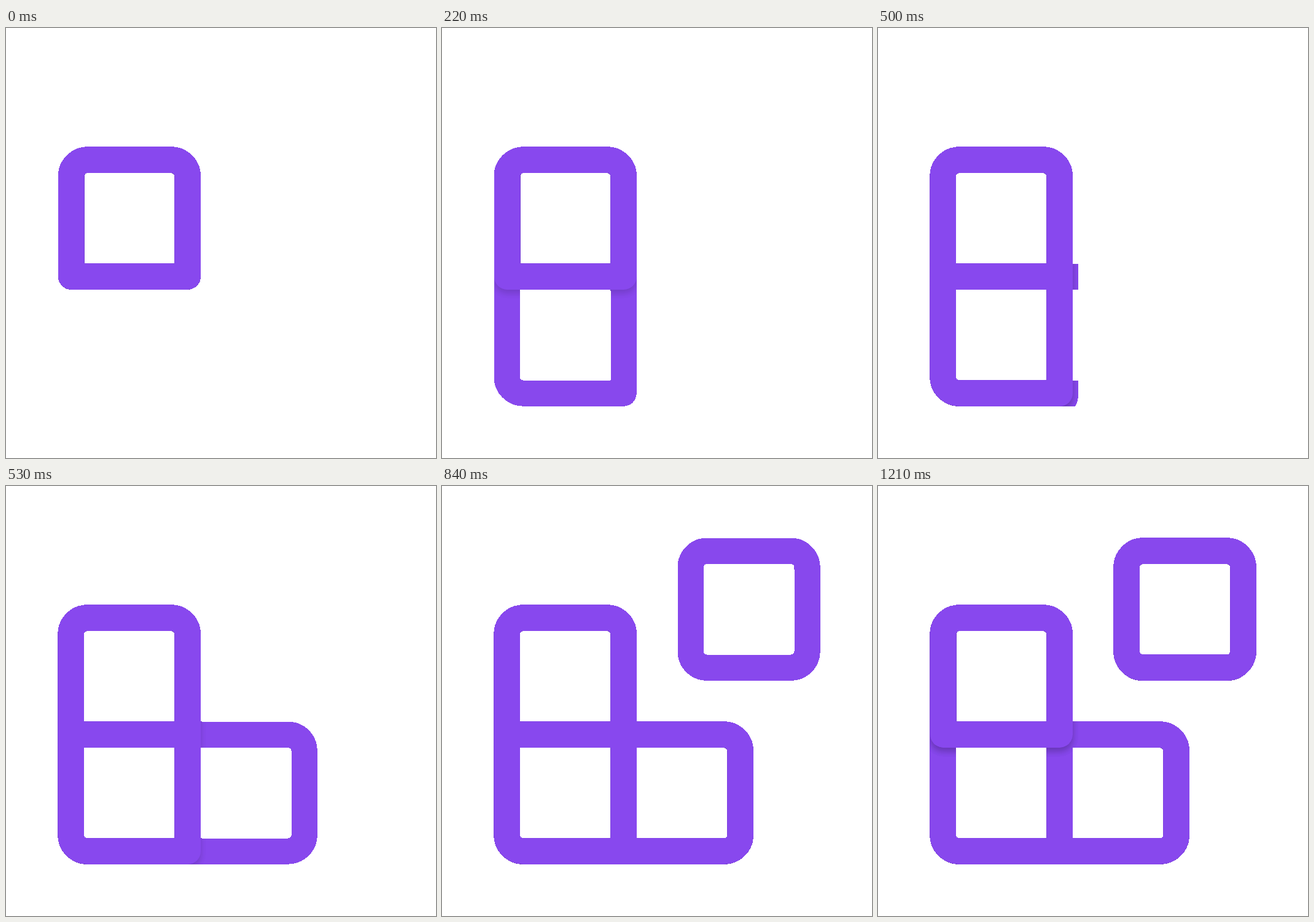
These frames come from a looping animation (700x700 px, 1.24 s). An HTML page with a canvas:

```html
<!DOCTYPE html>
<html lang="en">
<head>
<meta charset="utf-8">
<title>Building blocks</title>
<style>
  html, body { margin: 0; width: 100%; height: 100%; overflow: hidden; background: #fff; }
  canvas { display: block; width: 700px; height: 700px; }
</style>
</head>
<body>
<canvas id="stage" width="700" height="700"></canvas>
<script>
const SIZE = 700;
const HOLD = 100, STEP = 30, STEPS = 8;
const STAGE = HOLD + (STEPS - 1) * STEP;
const LOOP = 4 * STAGE;

const COLOR = '#8848ee';
const SIDE = 190, R = 26.67;
const X0 = 105.67, X1 = X0 + SIDE;
const Y0 = 214.57, Y1 = Y0 + SIDE;

// Each block: left, top, width, corner radii (tl, tr, br, bl)
const top1 = [X0, Y0, SIDE, [R, R, 0, 0]];
const low1 = [X0, Y1, SIDE, [0, 0, 0, R]];
const low2 = [X1, Y1, SIDE, [0, R, R, 0]];
const loose = [404.57, X0, SIDE, [R, R, R, R]];
const single = [X0 + 0.55, Y0, SIDE - 0.55, [R, R, 0, 0]];

const shapes = [
  [single],
  [top1, low1],
  [top1, low1, low2],
  [top1, low1, low2, loose]
];

function makeCanvas() {
  const canvas = document.createElement('canvas');
  canvas.width = canvas.height = SIZE;
  return canvas;
}

function addBlock(ctx, [x, y, w, [tl, tr, br, bl]]) {
  const r = x + w, b = y + SIDE;
  ctx.moveTo(x + w / 2, y);
  ctx.arcTo(r, y, r, b, tr);
  ctx.arcTo(r, b, x, b, br);
  ctx.arcTo(x, b, x, y, bl);
  ctx.arcTo(x, y, r, y, tl);
  ctx.closePath();
}

function makeLayer(blocks) {
  const canvas = makeCanvas();
  const ctx = canvas.getContext('2d');
  ctx.strokeStyle = COLOR;
  ctx.lineWidth = 42.67;
  ctx.lineJoin = 'round';
  ctx.shadowColor = 'rgba(0,0,0,0.27)';
  ctx.shadowBlur = 11;
  ctx.shadowOffsetY = 6;
  ctx.beginPath();
  blocks.forEach(block => addBlock(ctx, block));
  ctx.stroke();
  return canvas;
}

const layers = shapes.map(makeLayer);
const scratch = makeCanvas();
const mix = scratch.getContext('2d', { willReadFrequently: true });

// Cross-fade two layers, then make every pixel fully solid or fully clear
function blend(stage, k) {
  const next = (stage + 1) % 4;
  const weight = { [stage]: 1 - k / STEPS, [next]: k / STEPS };
  mix.globalAlpha = 1;
  mix.clearRect(0, 0, SIZE, SIZE);
  for (const i of [stage, next].sort((a, b) => b - a)) {
    mix.globalAlpha = weight[i];
    mix.drawImage(layers[i], 0, 0);
  }
  const image = mix.getImageData(0, 0, SIZE, SIZE);
  const px = image.data;
  for (let i = 3; i < px.length; i += 4) px[i] = px[i] > 128 ? 255 : 0;
  mix.putImageData(image, 0, 0);
}

// Within a stage each step paints over the one before
function makeStage(stage) {
  const steps = [];
  for (let k = 0; k < STEPS; k++) {
    const canvas = makeCanvas();
    const ctx = canvas.getContext('2d');
    blend(stage, k);
    if (k) ctx.drawImage(steps[k - 1], 0, 0);
    ctx.drawImage(scratch, 0, 0);
    steps.push(canvas);
  }
  return steps;
}

const stages = layers.map((_, i) => makeStage(i));
const view = document.getElementById('stage').getContext('2d');

function draw() {
  const time = performance.now() % LOOP;
  const local = time % STAGE;
  const k = local < HOLD ? 0 : 1 + Math.floor((local - HOLD) / STEP);
  view.clearRect(0, 0, SIZE, SIZE);
  view.drawImage(stages[Math.floor(time / STAGE)][Math.min(k, STEPS - 1)], 0, 0);
  requestAnimationFrame(draw);
}
draw();
</script>
</body>
</html>
```
